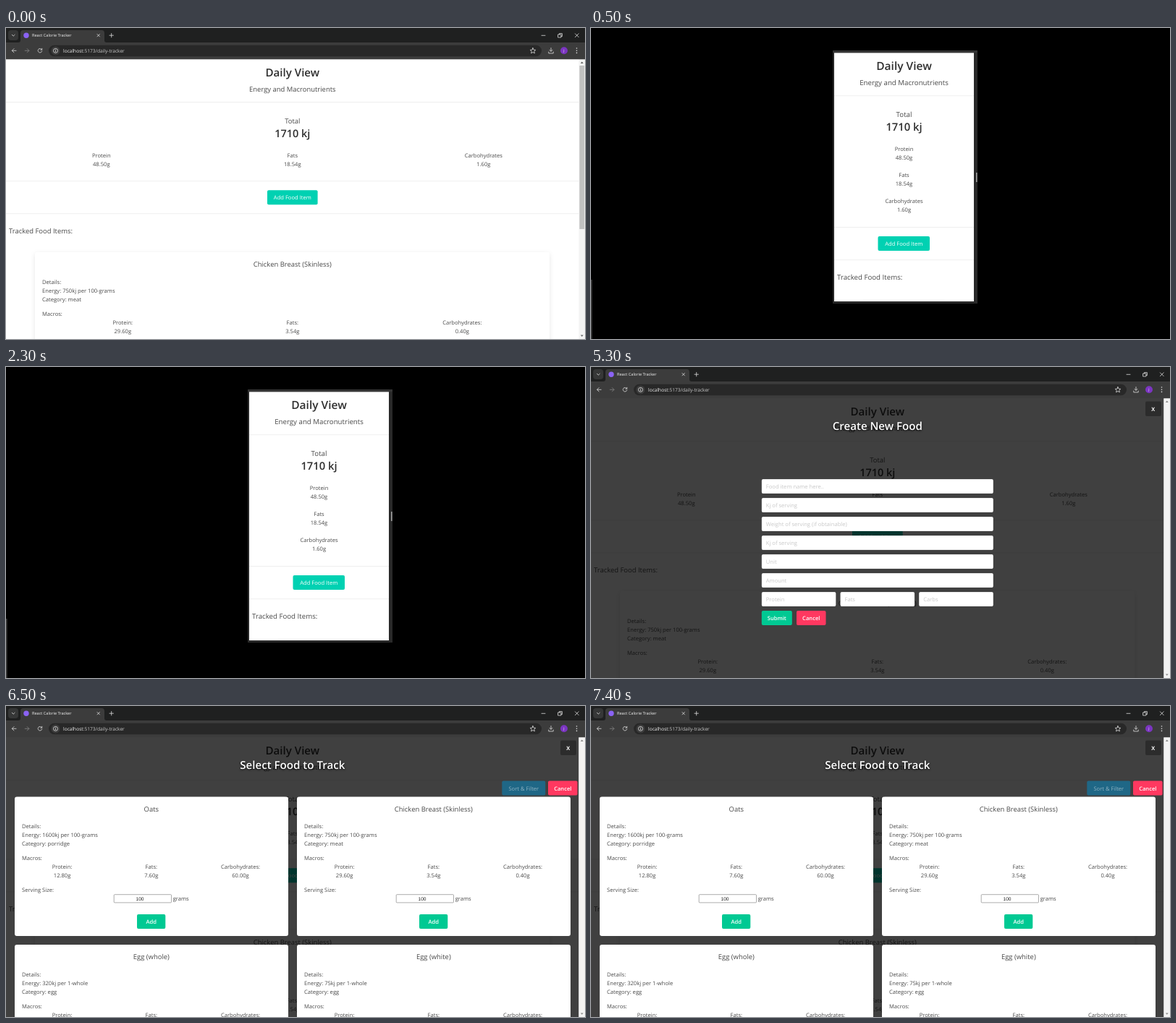
An HTML page that plays this animation: 800x430 px, repeating every 8000 ms.

```html
<!DOCTYPE html>
<html lang="en">
<head>
<meta charset="utf-8">
<title>Calorie tracker</title>
<style>
html, body { margin: 0; width: 100%; height: 100%; overflow: hidden; background: #fff; }
svg { display: block; width: 100vw; height: 100vh; }
text { font-family: "Open Sans", "Noto Sans", sans-serif; text-rendering: geometricPrecision; white-space: pre; }
.num { font-family: "Liberation Sans", Arial, sans-serif; }
.card { fill: #fff; filter: drop-shadow(0 2px 3px rgba(10, 10, 10, .1)); }
.head { filter: drop-shadow(0 1px 1.5px rgba(0, 0, 0, .8)); }
.line { fill: none; stroke-linecap: round; stroke-linejoin: round; }
</style>
</head>
<body>
<svg id="stage" viewBox="0 0 800 430" preserveAspectRatio="none"></svg>
<script>
const LOOP = 8000;
const INK = '#4a4a4a', DARK = '#2f2f2f', TEAL = '#00d1b2', GREEN = '#00c993', RED = '#ff3860';
const BODY = 7.6, LEAD = 9.45, TITLE = 15.1;

const rect = (x, y, w, h, fill, r = 0, more = '') =>
  `<rect x="${x}" y="${y}" width="${w}" height="${h}" rx="${r}" fill="${fill}" ${more}/>`;
const circle = (x, y, r, fill, more = '') => `<circle cx="${x}" cy="${y}" r="${r}" fill="${fill}" ${more}/>`;
const line = (d, stroke = '#dedede', w = .8) => `<path class="line" d="${d}" stroke="${stroke}" stroke-width="${w}"/>`;

// y is the middle of the capitals
function text(x, y, str, { size = BODY, fill = INK, weight = 400, mid = false, cls = '' } = {}) {
  const s = str.replace(/&/g, '&amp;');
  return `<text class="${cls}" x="${x}" y="${(y + size * .365).toFixed(2)}" font-size="${size}" fill="${fill}"` +
    ` font-weight="${weight}" text-anchor="${mid ? 'middle' : 'start'}">${s}</text>`;
}
const mid = (x, y, str, o = {}) => text(x, y, str, { ...o, mid: true });
const title = (x, y, str, size = TITLE) => mid(x, y, str, { size, weight: 600, fill: DARK });
const button = (x, y, w, str, fill, weight = 600, color = '#fff') =>
  rect(x, y, w, 20, fill, 2) + mid(x + w / 2, y + 10.3, str, { fill: color, weight });

function chrome() {
  const dots = [28, 31.2, 34.4].map(y => circle(788.5, y, .8, '#dedede')).join('');
  return rect(0, 0, 800, 21, '#1f2020') + rect(0, 20, 800, 23.3, '#3c3c3c') +
    rect(3, 3, 14, 14, '#363737', 4) + line('M8.3 9.3l1.9 1.9 1.9-1.9') +
    '<path d="M17 20q3 0 3-3V7q0-4 4-4h108q4 0 4 4v10q0 3 3 3z" fill="#3c3c3c"/>' +
    circle(28, 10.2, 3.7, '#8b63f5') +
    text(36, 10.2, 'React Calorie Tracker', { size: 5.6, fill: '#f2f2f2' }) +
    line('M126 8.5l3.4 3.4M129.4 8.5l-3.4 3.4') +
    line('M143 10.2h5.4M145.7 7.5v5.4') +
    line('M740 10.3h5') +
    line('M763 9h4v4h-4zM764.4 9V7.6h4v4H767') +
    line('M786.4 7.8l4.8 4.8M791.2 7.8l-4.8 4.8') +
    line('M14 31.3H8.4m2.6-2.7l-2.7 2.7 2.7 2.7') +
    line('M26.2 31.3h5.6m-2.6-2.7l2.7 2.7-2.7 2.7', '#848484') +
    line('M49.4 29.8a2.8 2.8 0 1 0 .3 2.2M49.7 28.3v1.9h-1.9') +
    rect(59, 23.7, 681, 15.6, '#282828', 7.8) +
    circle(68.5, 31.4, 6, '#3c3c3c') +
    circle(68.5, 31.4, 3, 'none', 'stroke="#e3e3e3" stroke-width=".8"') +
    line('M68.5 31.2v1.6M68.5 29.8v.1', '#e3e3e3') +
    text(79, 31.5, 'localhost<tspan fill="#c9c9c9">:5173/daily-tracker</tspan>', { size: 6.6, fill: '#f0f0f0' }) +
    line('M728 27.6l1.1 2.5 2.7.3-2 1.8.6 2.7-2.4-1.4-2.4 1.4.6-2.7-2-1.8 2.7-.3z') +
    line('M753 27.6v4.6m-2-1.9l2 2 2-2M749.8 33v2h6.4v-2') +
    circle(771, 31.3, 5, '#7b35c1') + mid(771, 31.3, 'J', { size: 4.8, fill: '#fff' }) + dots;
}

function scrollbar(thumb) {
  return rect(791.5, 43.3, 8.5, 386.7, '#f3f3f3') +
    (thumb ? rect(792.4, 52, 6.7, 226, '#c1c1c1') : '') +
    `<path d="M793.8 49l2-2.4 2 2.4zM793.8 424.4l2 2.4 2-2.4z" fill="${thumb ? '#606060' : '#8a8a8a'}"/>`;
}

const pair = (x, y, name, value) => mid(x, y, name) + mid(x, y + 12, value);

// Food details: left edge, heading centre, macro spacing
function food(left, cx, y, step, [name, energy, kind, ...grams]) {
  const names = ['Protein:', 'Fats:', 'Carbohydrates:'];
  return mid(cx, y, name, { size: LEAD }) +
    ['Details:', `Energy: ${energy}`, `Category: ${kind}`]
      .map((s, i) => text(left, y + 24 + i * 12, s)).join('') +
    text(left, y + 68, 'Macros:') +
    names.map((s, i) => pair(cx + (i - 1) * step, y + 80, s, grams[i] + 'g')).join('');
}

const OATS = ['Oats', '1600kj per 100-grams', 'porridge', '12.80', '7.60', '60.00'];
const CHICKEN = ['Chicken Breast (Skinless)', '750kj per 100-grams', 'meat', '29.60', '3.54', '0.40'];
const EGG = ['Egg (whole)', '320kj per 1-whole', 'egg', '', '', ''];
const WHITE = ['Egg (white)', '75kj per 1-whole', 'egg', '', '', ''];
const TOTALS = [['Protein', '48.50g'], ['Fats', '18.54g'], ['Carbohydrates', '1.60g']];

function page() {
  const rule = y => rect(0, y, 791.5, .9, '#ededed');
  return rect(0, 43, 800, 387, '#fff') +
    title(395.8, 61.2, 'Daily View') +
    mid(395.8, 84.5, 'Energy and Macronutrients', { size: LEAD }) + rule(102) +
    mid(395.8, 128.2, 'Total', { size: LEAD }) + title(395.8, 145.3, '1710 kj', 14.5) +
    TOTALS.map((p, i) => pair(131.8 + i * 264, 176, ...p)).join('') + rule(211.3) +
    button(361, 224.3, 69.6, 'Add Food Item', TEAL, 400) + rule(256.3) +
    text(4, 280.6, 'Tracked Food Items:', { size: LEAD }) +
    rect(40, 310, 711, 140, '#fff', 3, 'class="card"') +
    food(50, 395.8, 327, 234.5, CHICKEN);
}

function phone() {
  const cx = 432.5, rule = y => rect(336, y, 193, .9, '#ededed');
  return rect(0, 0, 800, 430, '#000') +
    rect(0, 348, 1.6, 82, '#3a3a3a') +
    rect(334, 31, 200, 350, '#292929') + rect(334, 31, 200, 3.4, '#343434') +
    rect(532, 200, 1.6, 13, '#a0a0a0') +
    rect(336, 34.4, 193, 343.6, '#fff') +
    title(cx, 52.2, 'Daily View', 15.5) +
    mid(cx, 75.6, 'Energy and Macronutrients', { size: 9.7 }) + rule(93.3) +
    mid(cx, 119.2, 'Total', { size: 9.7 }) + title(cx, 136.3, '1710 kj', 14.8) +
    TOTALS.map((p, i) => pair(cx, 167 + i * 36.3, ...p)).join('') + rule(275.2) +
    button(396.5, 288, 71.5, 'Add Food Item', TEAL, 400) + rule(320.3) +
    text(340, 344, 'Tracked Food Items:', { size: 9.7 }) +
    rect(376, 375.5, 112, 1, '#f9f9f9');
}

function modal(heading) {
  return page() + rect(0, 43, 791.5, 387, 'rgba(0,0,0,.75)') + scrollbar(false) +
    rect(766, 47.5, 22, 20.5, '#2c2c2c', 2) +
    mid(776.6, 58, 'X', { size: 7.4, weight: 700, fill: '#fff' }) +
    mid(395.8, 81.2, heading, { size: TITLE, weight: 600, fill: '#fff', cls: 'head' });
}

function form() {
  const field = (x, y, w, hint) => rect(x, y, w, 20, '#dbdbdb', 2) +
    rect(x + .4, y + .4, w - .8, 19.2, '#fff', 1.6) +
    text(x + 6, y + 10.6, hint, { fill: '#c8c8c8' });
  const hints = ['Food item name here..', 'Kj of serving', 'Weight of serving (if obtainable)',
    'Kj of serving', 'Unit', 'Amount'];
  return modal('Create New Food') +
    hints.map((s, i) => field(235.8, 155 + i * 26, 320, s)).join('') +
    ['Protein', 'Fats', 'Carbs'].map((s, i) => field(235.8 + i * 108.7, 311, 102.6, s)).join('') +
    button(235.8, 337, 42, 'Submit', GREEN) + button(284, 337, 40.5, 'Cancel', RED);
}

function picker() {
  const card = (x, y, item) => {
    const cx = x + 188.8;
    return rect(x, y, 378, 192.5, '#fff', 3) + food(x + 10, cx, y + 17, 123.2, item) +
      text(x + 10, y + 128.5, 'Serving Size:') +
      rect(x + 137.2, y + 135.2, 79.3, 11.2, '#fff', 1, 'stroke="#767676" stroke-width=".6"') +
      mid(x + 173, y + 141, '100', { size: 6.6, fill: '#222', cls: 'num' }) +
      text(x + 218.7, y + 140.5, 'grams') +
      button(x + 169, y + 162.5, 39.3, 'Add', GREEN);
  };
  return modal('Select Food to Track') +
    button(685.3, 103.6, 60, 'Sort & Filter', '#1f6786', 400, '#8fb3c3') +
    button(749, 103.6, 40.6, 'Cancel', RED) +
    card(12, 125.5, OATS) + card(402, 125.5, CHICKEN) +
    card(12, 330, EGG) + card(402, 330, WHITE);
}

// Each scene covers the ones before it until the loop restarts
const scenes = [
  [0, page() + scrollbar(true) + chrome()],
  [500, phone()],
  [3500, form() + chrome()],
  [6500, picker() + chrome()]
];

const stage = document.getElementById('stage');
stage.innerHTML = scenes.map(([from, art]) => `<g opacity="${from ? 0 : 1}">${art}</g>`).join('');
scenes.forEach(([from], i) => {
  if (!from) return;
  stage.children[i].animate([
    { offset: 0, opacity: 0, easing: 'step-end' },
    { offset: from / LOOP, opacity: 1, easing: 'step-end' },
    { offset: 1, opacity: 1 }
  ], { duration: LOOP, iterations: Infinity });
});
</script>
</body>
</html>
```
